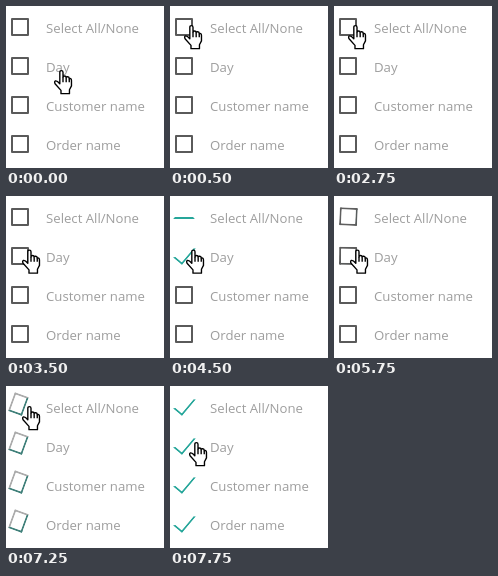
Write an HTML page that moves like this. It is 158 px wide and 162 px high and loops after 8 s.

```html
<!DOCTYPE html>
<html lang="en">
<head>
<meta charset="utf-8">
<title>Checkbox list</title>
<style>
  html, body { margin: 0; width: 100%; height: 100%; overflow: hidden; background: #fff; }
  #stage { position: relative; width: 158px; height: 162px; overflow: hidden; }
  .row { position: absolute; left: 0; height: 39px; width: 158px; }
  .row span {
    position: absolute; left: 40px; top: 12px; white-space: nowrap;
    font: 13.2px/20px "Open Sans", "Noto Sans", sans-serif; color: #9e9e9e;
  }
  .row i {
    position: absolute; box-sizing: border-box; border: 2px solid; border-radius: 1px;
    transform-origin: 100% 100%;
  }
  #hand { position: absolute; left: 0; top: 0; overflow: visible; }
</style>
</head>
<body>
<div id="stage"></div>
<script>
const LOOP = 8000;
const PITCH = 39;
const LABELS = ['Select All/None', 'Day', 'Customer name', 'Order name'];
const GREY = [90, 90, 90, 1], GREEN = [38, 166, 154, 1];
const CLEAR = [90, 90, 90, 0];

// Shapes of the box; near = top and left borders
const OFF = { x: 5, y: 12, w: 18, h: 18, turn: 0, near: GREY, right: GREY, bottom: GREY };
const ON = { x: 0, y: 8, w: 12, h: 22, turn: 40, near: CLEAR, right: GREEN, bottom: GREEN };
const DASH = { x: -7, y: 1, w: 10, h: 22, turn: 90, near: CLEAR, right: GREEN, bottom: CLEAR };

const mix = (a, b, t) => Array.isArray(a) ? a.map((v, i) => mix(v, b[i], t)) : a + (b - a) * t;
const blend = (a, b, t) => Object.fromEntries(Object.keys(a).map(k => [k, mix(a[k], b[k], t)]));
const all = shape => LABELS.map(() => shape);

const none = all(OFF);
const every = all(ON);
const onlyDay = [DASH, ON, OFF, OFF];
const dayLeaving = [blend(OFF, DASH, 0.03), blend(OFF, ON, 0.015), OFF, OFF];
// the box slides left ahead of its turn
const halfway = all({ ...blend(OFF, ON, 0.5), x: 0.5 });

// start time, hand position, box shapes
const STEPS = [
  [0, 48, 64, none],
  [250, 14, 23, none],
  [500, 14, 19, none],
  [1250, 14, 19, every],
  [2750, 14, 19, none],
  [3500, 16, 53.5, none],
  [4500, 16, 53.5, onlyDay],
  [5750, 16, 53.5, dayLeaving],
  [6000, 16, 53.5, none],
  [6750, 21, 28, none],
  [7000, 16, 20, none],
  [7250, 16, 20, halfway],
  [7500, 16, 20, every],
  [7750, 19, 56, every]
];

const stage = document.getElementById('stage');
stage.innerHTML = LABELS.map((text, i) =>
  `<div class="row" style="top:${i * PITCH}px"><i></i><span>${text}</span></div>`).join('') +
  `<svg id="hand" width="18" height="24.4" viewBox="0 0 17 23" fill="#fff" stroke="#000" stroke-width="1.3" stroke-linejoin="round">
    <path d="M5.5 13V2.2Q5.5.6 7 .6Q8.5.6 8.5 2.2V7Q8.7 5.6 10 5.6Q11.4 5.6 11.5 7.2Q11.8 6.3 13 6.4
      Q14.4 6.6 14.4 8.2Q16.5 7.4 16.5 10V15L14.6 18.6V22.3H6.6V19.2L1 13Q.1 11 1.3 10.3Q2.8 9.7 5.5 13Z"/>
    <path fill="none" d="M8.5 7V11.5M11.5 7.2V11.5M14.4 8.2V11.5"/>
  </svg>`;
const boxes = [...stage.querySelectorAll('i')];
const hand = document.getElementById('hand');

function drawBox(el, s) {
  const near = `rgba(${s.near})`;
  Object.assign(el.style, {
    left: s.x + 'px', top: s.y + 'px', width: s.w + 'px', height: s.h + 'px',
    transform: s.turn ? `rotate(${s.turn}deg)` : 'none',
    borderColor: `${near} rgba(${s.right}) rgba(${s.bottom}) ${near}`
  });
}

let shown;
function draw(now) {
  const t = now % LOOP;
  const step = STEPS.findLast(s => s[0] <= t) || STEPS[0];
  if (step !== shown) {
    shown = step;
    const [, x, y, shapes] = step;
    hand.style.transform = `translate(${x}px, ${y}px)`;
    boxes.forEach((el, i) => drawBox(el, shapes[i]));
  }
}

const start = performance.now();
function tick() {
  draw(performance.now() - start);
  requestAnimationFrame(tick);
}
tick();
</script>
</body>
</html>
```
